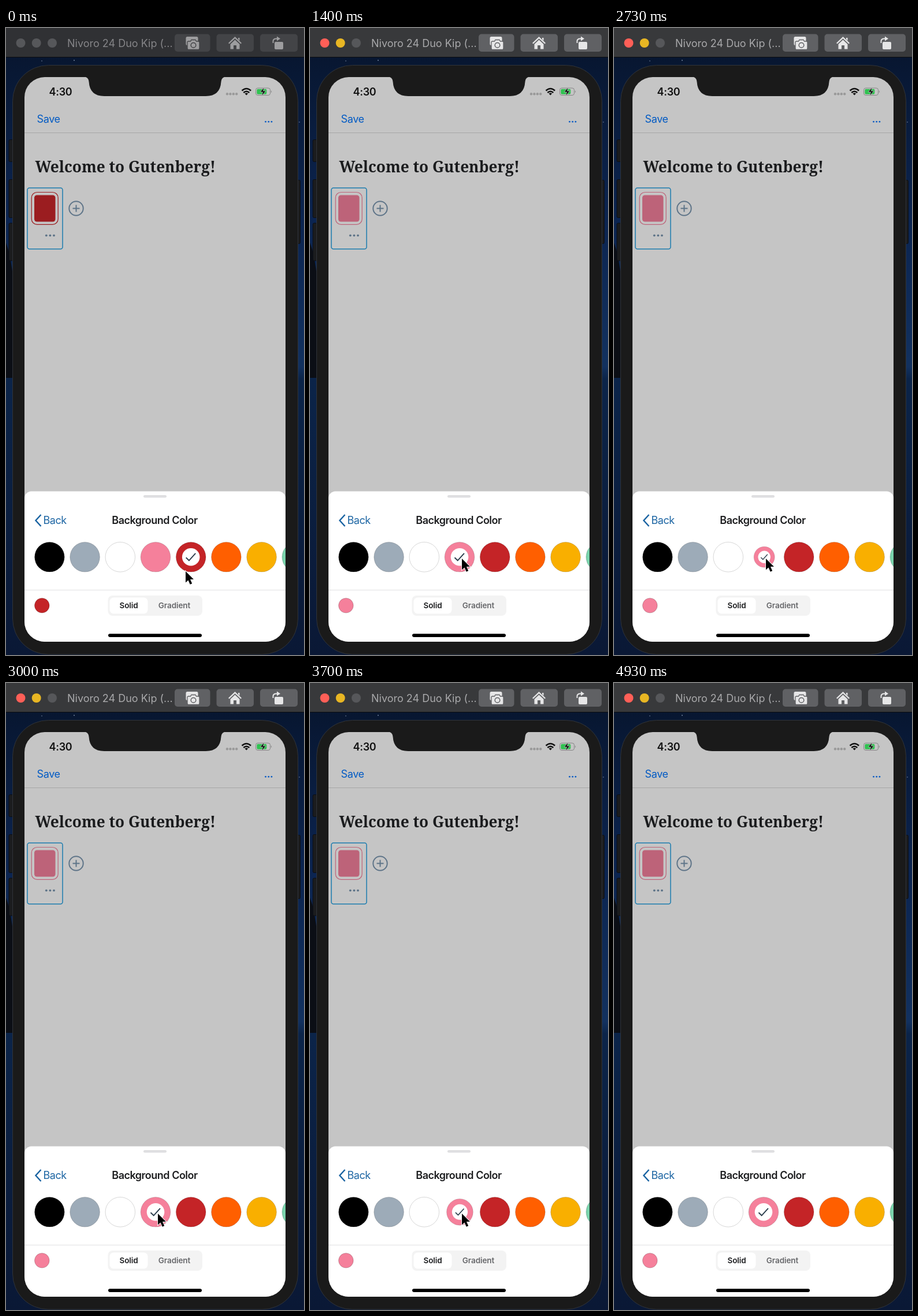
Animation of 516x1086 px, one loop 4.96 s. Source, as an HTML page:

```html
<!DOCTYPE html>
<html lang="en">
<head>
<meta charset="utf-8">
<title>Background color picker</title>
<style>
  html, body { margin: 0; width: 100%; height: 100%; overflow: hidden; background: #0a1a38; }
  svg { display: block; width: 516px; height: 1086px; font-family: Inter, sans-serif; font-size: 18px; }
  .line { fill: none; stroke: currentColor; }
  .semi { font-weight: 600; }
  #bar { --bar: #38393b; --btn: #606164; --ink: #e6e6e7; --title: #a9a9ab; --red: #ff5f57; --amber: #e8b623; }
  #bar.idle { --bar: #303134; --btn: #434447; --ink: #9d9d9f; --title: #858588; --red: #56575a; --amber: #56575a; }
</style>
</head>
<body>
<svg viewBox="0 0 516 1086">
  <defs>
    <linearGradient id="sky" x2="0" y2="1">
      <stop offset="0" stop-color="#07142b"/>
      <stop offset=".3" stop-color="#0b2450"/>
      <stop offset=".54" stop-color="#12315f"/>
      <stop offset=".56" stop-color="#0b2449"/>
      <stop offset="1" stop-color="#0a1835"/>
    </linearGradient>
    <clipPath id="screen"><rect x="32" y="85" width="452" height="978" rx="35"/></clipPath>
  </defs>

  <!-- wallpaper -->
  <rect width="516" height="1086" fill="url(#sky)"/>
  <path d="M0 372L6 390L14 440V606H0Z" fill="#0b0e15"/>
  <g fill="#7d8ca6">
    <circle cx="62" cy="57" r=".8"/><circle cx="118" cy="56" r=".9"/>
    <circle cx="477" cy="75" r=".9"/><circle cx="508" cy="163" r=".8"/>
  </g>

  <!-- simulator title bar -->
  <g id="bar">
    <rect width="516" height="50" fill="var(--bar)"/>
    <path d="M0 50.5H516" stroke="#0b0c0e"/>
    <circle cx="25.5" cy="26" r="8" fill="var(--red)"/>
    <circle cx="52.7" cy="26" r="8" fill="var(--amber)"/>
    <circle cx="80" cy="26" r="8" fill="#56575a"/>
    <text x="106" y="33" fill="var(--title)">Nivoro 24 Duo Kip (...</text>
    <g fill="var(--btn)">
      <rect x="292" y="10.5" width="61.5" height="30.5" rx="5"/>
      <rect x="364.500" y="10.5" width="64.500" height="30.5" rx="5"/>
      <rect x="440" y="10.5" width="65" height="30.5" rx="5"/>
    </g>
    <g fill="var(--ink)">
      <rect x="311.500" y="15" width="21" height="15" rx="2.500"/>
      <path d="M316 23H319.500L321 20.500H328L329.500 23H333Q335 23 335 25V35Q335 37.500 333 37.500H316Q314 37.500 314 35V25Q314 23 316 23Z" stroke="var(--btn)" stroke-width="1.300"/>
      <circle cx="324.500" cy="29.800" r="4.300" fill="none" stroke="var(--btn)" stroke-width="1.500"/>
      <path d="M396.500 15L408 26L406.500 27.500L396.500 18.200L386.500 27.500L385 26ZM396.500 20.500L404.500 28V36.500H399V30H394V36.500H388.500V28ZM402 17H404.500V22L402 19.500Z"/>
      <rect x="465" y="24" width="15" height="13" rx="2"/>
      <path d="M462.500 26V23Q462.500 18.500 468 18.500H471" fill="none" stroke="var(--ink)" stroke-width="2"/>
      <path d="M469 14.500L475 18.500L469 22.500Z"/>
    </g>
  </g>

  <!-- device -->
  <g fill="#1b1c1e" stroke="#0c0f15">
    <rect x="5" y="193.500" width="9" height="38" rx="2"/>
    <rect x="5" y="262.500" width="9" height="66" rx="2"/>
    <rect x="5" y="338" width="9" height="65" rx="2"/>
    <rect x="500" y="263.500" width="9.500" height="110" rx="2"/>
  </g>
  <rect x="11.500" y="64.500" width="494" height="1020.500" rx="62" fill="#1a1a1a" stroke="#30343a"/>

  <g clip-path="url(#screen)">
    <rect x="32" y="85" width="452" height="978" fill="#c5c5c5"/>
    <path d="M134 84Q143 85 143.500 93Q145 118 170 118H346Q371 118 372.500 93Q373 85 382 84Z" fill="#1a1a1a"/>

    <!-- status bar -->
    <text class="semi" x="74.500" y="117" fill="#111" letter-spacing="-.3">4:30</text>
    <g fill="#999">
      <circle cx="383" cy="114.300" r="2.200"/><circle cx="388.400" cy="114.300" r="2.200"/>
      <circle cx="393.800" cy="114.300" r="2.200"/><circle cx="399.200" cy="114.300" r="2.200"/>
    </g>
    <g fill="none" stroke="#111" stroke-width="2.600">
      <path d="M408.500 108.500Q416.300 101.500 424.100 108.500M411.300 112Q416.300 107.500 421.300 112"/>
      <path d="M413.500 113.500Q416.300 111.500 419.100 113.500L416.300 116.500Z" fill="#111" stroke="none"/>
    </g>
    <rect x="432.500" y="104" width="25" height="12.500" rx="3.500" fill="none" stroke="#858585"/>
    <rect x="434.300" y="105.800" width="17" height="9" rx="2" fill="#2fc250"/>
    <path d="M459 108Q461 110.200 459 112.500Z" fill="#858585"/>
    <path d="M447 102.500L440 111H444.500L442.500 118L450 109H445.500Z" fill="#111" stroke="#c5c5c5" stroke-width=".7"/>

    <!-- editor -->
    <g fill="#005ac4">
      <text x="53.500" y="164" letter-spacing="-.35">Save</text>
      <circle cx="449.500" cy="162.300" r="1.400"/><circle cx="454.700" cy="162.300" r="1.400"/><circle cx="459.900" cy="162.300" r="1.400"/>
    </g>
    <path d="M32 181.500H484" stroke="#a6a6a6"/>
    <text x="50.500" y="249.500" fill="#1b1c1e" font-family="Noto Serif, serif" font-weight="700" font-size="26.200">Welcome to Gutenberg!</text>
    <rect x="37" y="277" width="61" height="105.800" rx="3.500" fill="none" stroke="#1b7cae" stroke-width="1.500"/>
    <g id="block">
      <rect class="line" x="44.200" y="284.500" width="46" height="55.800" rx="9.500" stroke-width="1.200"/>
      <rect x="49" y="289.500" width="36.500" height="46" rx="4.500" fill="currentColor"/>
    </g>
    <g fill="#5e7488">
      <circle cx="69.800" cy="359.300" r="1.900"/><circle cx="76.400" cy="359.300" r="1.900"/><circle cx="83" cy="359.300" r="1.900"/>
    </g>
    <path d="M115.500 312.500H127.500M121.500 306.500V318.500" stroke="#5e7488" stroke-width="2"/>
    <circle cx="121.500" cy="312.500" r="12.200" fill="none" stroke="#5e7488" stroke-width="2"/>

    <!-- bottom sheet -->
    <rect x="32" y="802.500" width="452" height="300" rx="12" fill="#fff"/>
    <rect x="238" y="809" width="40" height="4.600" rx="2.300" fill="#dfdfe1"/>
    <path d="M60.500 843L51.500 853L60.500 863" fill="none" stroke="#1c65a3" stroke-width="2.500"/>
    <text x="64.500" y="859" fill="#1c65a3" letter-spacing="-.5">Back</text>
    <text class="semi" x="257.500" y="859" fill="#1c1d1f" text-anchor="middle" letter-spacing="-.5">Background Color</text>
    <g id="swatches"></g>
    <path d="M32 973.500H484" stroke="#e1e1e2"/>
    <circle id="dot" cx="62.300" cy="1000.300" r="12.800" fill="currentColor" stroke="#000" stroke-opacity=".2"/>
    <rect x="176.500" y="983" width="163.500" height="35" rx="8" fill="#f3f3f3"/>
    <rect x="179.500" y="986.500" width="66" height="28" rx="7" fill="#fff"/>
    <g class="semi" font-size="13.500" text-anchor="middle" letter-spacing="-.1">
      <text x="212.500" y="1005.300" fill="#1c1d1f">Solid</text>
      <text x="291.500" y="1005.300" fill="#66676a">Gradient</text>
    </g>
    <rect x="177" y="1049.300" width="162" height="5.600" rx="2.800"/>
  </g>

  <path id="cursor" d="M0 0V19.500L4.500 15.400L7.700 22.800L11.200 21.300L8 14H14Z" stroke="#fff" stroke-width="1.800" paint-order="stroke"/>
</svg>

<script>
const LOOP = 4960, ACTIVATE = 680, PRESS = 200;
const CLICKS = [890, 1708, 2530, 3350];
const COLORS = ['#000', '#9dabb8', '#fff', '#f5809b', '#c42427', '#ff5f00', '#f9af00', '#7ad4ac'];
const PINK = 3, RED = 4;
const DIMMED = { [PINK]: '#bd6379', [RED]: '#9b1d20' };
// time, x, y of the pointer tip
const PATH = [[0, 311, 941], [150, 311, 941], [560, 263, 919], [3800, 263, 919], [4230, 139, 323], [4520, 66, -30]];

const $ = id => document.getElementById(id);
const clamp = v => Math.min(1, Math.max(0, v));
const easeIn = v => clamp(v) ** 1.7;
const smooth = v => v * v * (3 - 2 * v);

$('swatches').innerHTML = COLORS.map((color, i) => `
  <g>
    <circle r="25.800" fill="${color}" stroke="#000" stroke-opacity=".16"/>
    <g class="check">
      <circle r="15.300" fill="#fff"/>
      <path d="M-8.500 1L-3.300 6L8 -6.500" fill="none" stroke="#2b3d4c" stroke-width="1.900"/>
    </g>
  </g>`).join('');
const swatches = [...$('swatches').children];
const checks = swatches.map(s => s.querySelector('.check'));

function pointer(t) {
  const next = PATH.findIndex(p => p[0] > t);
  if (next < 0) return PATH.at(-1).slice(1);
  const [t0, x0, y0] = PATH[next - 1], [t1, x1, y1] = PATH[next];
  const linear = (t - t0) / (t1 - t0);
  const k = next === 2 ? smooth(linear) : next === 4 ? linear ** 1.4 : linear;
  return [x0 + (x1 - x0) * k, y0 + (y1 - y0) * k];
}

// Each press shrinks the swatch to 70% and lets it grow back.
function pressScale(t) {
  const since = t - (CLICKS.findLast(c => c <= t) ?? -LOOP);
  const depth = since < PRESS ? easeIn(since / PRESS) : 1 - easeIn(since / PRESS - 1);
  return 1 - 0.3 * depth;
}

function render(t) {
  const selected = t < CLICKS[0] ? RED : PINK;
  $('bar').classList.toggle('idle', t < ACTIVATE);
  $('block').style.color = DIMMED[selected];
  $('dot').style.color = COLORS[selected];
  swatches.forEach((swatch, i) => {
    const scale = i === PINK ? pressScale(t) : 1;
    const x = 75.4 + 61.2 * i + 4 * (1 - scale);
    swatch.setAttribute('transform', `translate(${x} 916.3) scale(${scale})`);
    const fade = i === PINK ? easeIn((t - CLICKS[0]) / PRESS) : 1;
    checks[i].setAttribute('opacity', i === selected ? fade : 0);
  });
  $('cursor').setAttribute('transform', `translate(${pointer(t).join(' ')})`);
}

function tick() {
  render(performance.now() % LOOP);
  requestAnimationFrame(tick);
}
tick();
</script>
</body>
</html>
```
